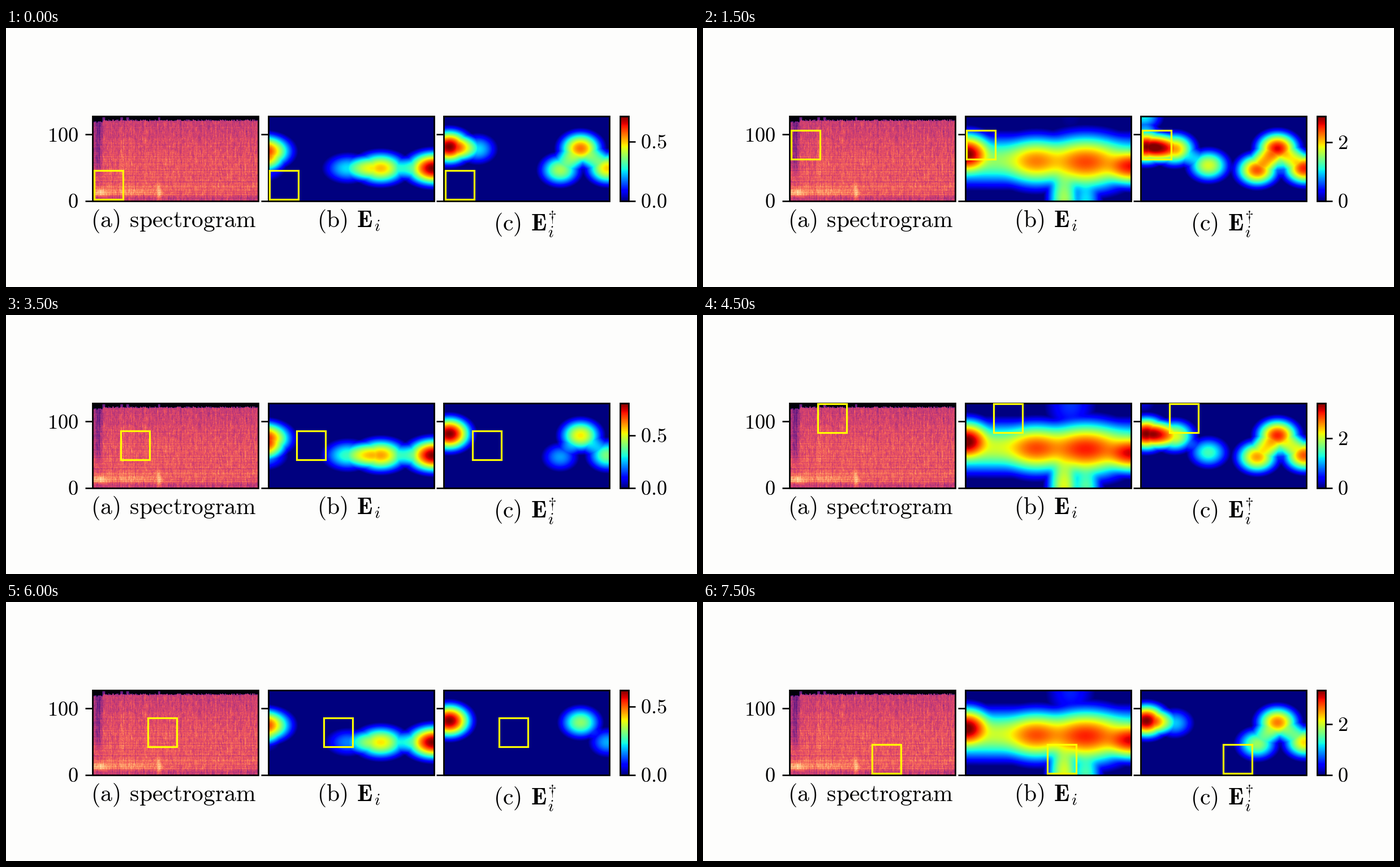
Write a matplotlib script that moves like this. It is 1222x458 px and loops after 8000 ms.

```python
import matplotlib.pyplot as plt
import numpy as np
from matplotlib.animation import FuncAnimation
from matplotlib.patches import Rectangle

plt.rcParams["mathtext.fontset"] = "cm"

W, H, DPI = 1222, 458, 100
PW, PH = 293, 150            # panel size
TOP, BOTTOM = 156, 305.7
LEFTS = (153, 463.7, 774.2)
FLOOR = 0.25                 # how far the heat sinks below zero

X = np.arange(PW) + 0.5
Y = (np.arange(PH) + 0.5)[:, None]

# Hot spots: x, y, height and, where it differs, their own spread
SPARSE = [(-8, 62, .9), (-8, 92, .3), (140, 92, .42), (198, 92, .74), (291, 92, 1)]
DENSE = [(146, 78, .53, 900, 36), (2, 67, 1), (125, 80, .73, 55, 36),
         (212, 82, .8, 68, 40), (292, 89, .88, 48, 27),
         (174, 150, .55, 24, 70), (212, 150, .35, 24, 55), (185, 0, .02, 45, 60)]
DAGGER = [(10, 54, 1), (60, 58, -.05), (120, 87, -.6), (206, 95, .28),
          (242, 57, .66), (290, 92, .5), (5, 0, -1.6)]

# Per step: colour bar maximum, and level of the right map (None is all cold)
PEAKS = [.712, 1.6, 3.2, 2.875, 2.6, .512, 2.5, .804,
         4.0, 3.4, 3.98, 3.6, .618, .66, .45, 3.32]
LEVELS = [-.6, -1, -1.8, -3.1, -2, None, -1.2, 0,
          -1.6, -1.8, -1.6, -1.4, .29, .2, None, -.55]


def heat(spots, level, spread, power=1):
    """Blend hot spots, lowered to a level and rescaled to peak near one."""
    total = np.zeros((PH, PW))
    if level is None:
        return total
    for x, y, h, *own in spots:
        sx, sy = own or spread
        bump = np.exp(-0.5 * (((X - x) / sx) ** 2 + ((Y - y) / sy) ** 2))
        lift = (h - level) / (1 - level) + FLOOR
        total += np.maximum(lift * bump - FLOOR, 0) ** power
    return total ** (1 / power)


def middle_map(peak):
    if peak < 1:
        return heat(SPARSE, 1.2 * (.804 - peak), (35, 22))
    return heat(DENSE, .36 * (2.875 - peak), (37, 29), power=4)


def spectrogram(rows=128, cols=250):
    rng = np.random.default_rng(4)
    y = (np.arange(rows) / rows)[:, None]
    x = np.arange(cols) / cols
    grain = rng.normal(size=(rows, cols))
    streak = sum(np.roll(grain, k, axis=0) for k in range(6)) / 6 ** 0.5

    def glow(x0, y0, sx, sy):
        return np.exp(-((x - x0) / sx) ** 2 - ((y - y0) / sy) ** 2)

    s = np.interp(y, [0, .1, .4, .8, .93, 1], [.52, .55, .61, .65, .61, .5])
    s = s + 0.035 * streak + 0.03 * rng.normal(size=(rows, cols))
    s = s + 0.02 * rng.normal(size=cols)
    s = s + 0.035 * rng.normal(size=(rows, 1)) * (0.3 + y ** 2)
    # loud low notes, then a quiet start on the left
    s = s + .2 * glow(.04, .9, .05, .05) + .13 * glow(.2, .89, .2, .04)
    s = s + .17 * glow(.4, .9, .018, .09) + .06 * glow(.18, .6, .012, .5)
    quiet = np.clip((.065 - x) / .02, 0, 1) * np.clip((.75 - y) / .2, .15, 1)
    s = s - quiet * (.08 + .22 * rng.random(cols))
    # silent strip along the top, broken by short sounds
    depth = .035 + .02 * rng.random(cols) + .02 * (x < .06)
    loud = sum(np.abs(x - x0) < .007 for x0 in (.065, .175, .21, .4))
    s = np.where(y < depth, .02 + .3 * loud, s)
    return np.clip(s, 0, 1)


fig = plt.figure(figsize=(W / DPI, H / DPI), dpi=DPI, facecolor="#fdfdfc")
ax = fig.add_axes([0, 0, 1, 1])
ax.axis("off")


def px(n):
    return n * 72 / DPI


def image(data, left, width=PW, cmap="jet"):
    return ax.imshow(data, extent=(left, left + width, BOTTOM, TOP), cmap=cmap,
                     aspect="auto", vmin=0, vmax=1, interpolation="bilinear")


def outline(x, y, w, h, color, lw, z):
    return ax.add_patch(Rectangle((x, y), w, h, fill=False, ec=color, lw=px(lw),
                                  joinstyle="miter", zorder=z))


def frame(left, width=PW):
    outline(left, TOP, width, BOTTOM - TOP, "black", 2.8, 4)


def tick(x, y):
    return ax.plot([x, x + 12], [y, y], color="black", lw=px(2.6),
                   solid_capstyle="butt", zorder=3)[0]


def text(x, y, s, size=36.5, ha="left"):
    return ax.text(x, y, f"${s}$", fontsize=px(size), ha=ha, va="baseline")


def caption(x, y, letter, rest):
    text(x, y, rf"\mathrm{{({letter})}}\hspace{{0.42}}{rest}", 41.7)


image(spectrogram(), LEFTS[0], cmap="magma")
maps = [image(np.zeros((PH, PW)), x) for x in LEFTS[1:]]
image(np.linspace(1, 0, 256)[:, None], 1086, 14.5)

boxes = []
for left in LEFTS:
    frame(left)
    for y in (188.3, 305.5):
        tick(left - 13, y)
    boxes.append(outline(0, 0, 51, 51, "#ffff00", 3.2, 5))
frame(1086, 14.5)

text(128, 201, "100", ha="right")
text(128, 318, "0", ha="right")
caption(149.5, 352, "a", r"\mathrm{spectrogram}")
caption(550, 352, "b", r"\mathbf{E}")
caption(862, 358, "c", r"\mathbf{E}")
for x, y, s in ((651, 359, "i"), (958, 370, "i"), (958, 342, r"\dagger")):
    text(x, y, s, 29.4)

bar_ticks = [(tick(1100.5, BOTTOM), text(1122, 318, "0")) for _ in range(3)]
ax.set_xlim(0, W)
ax.set_ylim(H, 0)


def label_bar(peak):
    step = next(s for s in (.25, .5, 1, 2) if 2 * s >= peak)
    digits = {.25: 2, .5: 1}.get(step, 0)
    for k, (line, label) in enumerate(bar_ticks):
        v = k * step
        y = BOTTOM - (BOTTOM - TOP) * v / peak
        line.set_ydata([y, y])
        label.set_y(y + 12.5)
        label.set_text(f"${v:.{digits}f}$")
        for part in (line, label):
            part.set_visible(v <= peak)


def draw(i):
    maps[0].set_data(middle_map(PEAKS[i]))
    maps[1].set_data(heat(DAGGER, LEVELS[i], (28, 22)))
    label_bar(PEAKS[i])
    # the window climbs five places, then moves one column right
    col, row = divmod(i, 5)
    for left, box in zip(LEFTS, boxes):
        box.set_xy((left + 2.6 + 47.7 * col, 252.2 - 23.8 * row))
    return [*maps, *boxes]


anim = FuncAnimation(fig, draw, frames=len(PEAKS), interval=500,
                     repeat=True, repeat_delay=0, blit=False)
plt.show()
```
